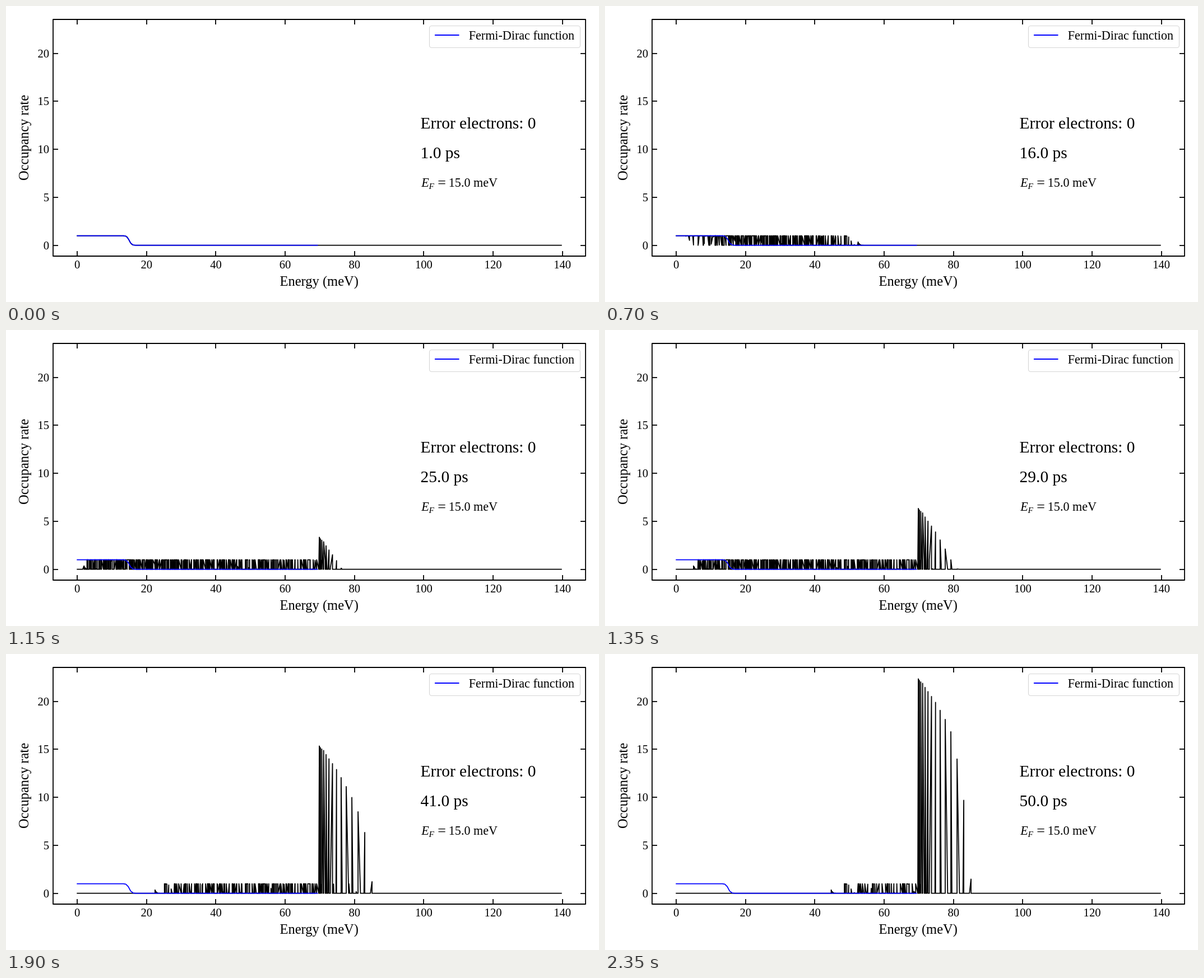
An HTML page with a canvas that plays this animation: 1058 by 529 pixels, repeating every 2.4 s.

```html
<!DOCTYPE html>
<html lang="en">
<head>
<meta charset="utf-8">
<title>Occupancy rate</title>
<style>
html, body { margin: 0; width: 100%; height: 100%; overflow: hidden; background: #fff; }
canvas { display: block; }
</style>
</head>
<body>
<canvas id="stage" width="1058" height="529"></canvas>
<script>
const ctx = document.getElementById('stage').getContext('2d');
const SERIF = '"Liberation Serif", "Times New Roman", serif';
const BOX = { left: 84, top: 24, right: 1034, bottom: 447 };
const LOOP = 2400, STEP = 50;

// Electron grid: N cells from the centre to the zone edge
const N = 30, CELL = 69.85 / (N * N), FERMI = 15, KT = 0.345;

const px = e => 127.2 + 6.182 * e;
const py = v => 427.7 - 17.15 * v;
const fermi = e => 1 / (1 + Math.exp((e - FERMI) / KT));
const initial = (i, j) => fermi(CELL * (i * i + j * j));

// States with kx >= 0, sorted by energy
const states = [];
for (let i = 0; i <= N; i++) {
  for (let j = -N; j <= N; j++) states.push({ i, j, q: i * i + j * j });
}
const order = q => (q % 7 === 4 || q % 7 === 5 ? -1 : 1);
states.sort((a, b) => a.q - b.q || order(a.q) * (a.i - b.i));

// The field shifts every row; electrons pile up at the zone edge
function occupancy({ i, j }, shift) {
  if (i < N) return initial(i - shift, j);
  let sum = 0;
  for (let k = N - shift; k <= N; k++) sum += initial(k, j);
  return sum;
}

function polyline(points, color) {
  ctx.beginPath();
  for (const [x, y] of points) ctx.lineTo(x, y);
  ctx.strokeStyle = color;
  ctx.stroke();
}

function text(str, x, y, size, align = 'left', style = '') {
  ctx.font = `${style} ${size}px ${SERIF}`;
  ctx.textAlign = align;
  ctx.fillStyle = '#000';
  ctx.fillText(str, x, y);
}

function drawAxes() {
  const { left, top, right, bottom } = BOX, len = 9;
  ctx.lineCap = 'butt';
  ctx.strokeStyle = '#000';
  ctx.strokeRect(left, top, right - left, bottom - top);
  for (let e = 0; e <= 140; e += 20) {
    const x = Math.round(px(e));
    polyline([[x, top], [x, top + len]], '#000');
    polyline([[x, bottom], [x, bottom - len]], '#000');
    text(e, px(e), 469, 20.6, 'center');
  }
  for (let v = 0; v <= 20; v += 5) {
    const y = Math.round(py(v));
    polyline([[left, y], [left + len, y]], '#000');
    polyline([[right, y], [right - len, y]], '#000');
    text(v, 77, py(v) + 7, 20.6, 'right');
  }
  text('Energy (meV)', 558.7, 500, 24.5, 'center');
  ctx.save();
  ctx.translate(40, 235.5);
  ctx.rotate(-Math.PI / 2);
  text('Occupancy rate', 0, 0, 24.5, 'center');
  ctx.restore();
}

function drawLegend() {
  ctx.save();
  ctx.lineWidth = 1.2;
  ctx.strokeStyle = '#d6d6d6';
  ctx.beginPath();
  ctx.roundRect(755.5, 35.5, 269, 39, 4);
  ctx.stroke();
  ctx.restore();
  polyline([[765, 52], [808.5, 52]], '#00f');
  text('Fermi-Dirac function', 825.7, 60, 22.1);
}

function drawNotes(ps) {
  text('Error electrons: 0', 739.6, 219.3, 29.45);
  text(ps.toFixed(1) + ' ps', 739.6, 271.7, 29.45);
  text('E', 741.3, 323, 22.1, 'left', 'italic');
  text('F', 754.6, 326.5, 15.4, 'left', 'italic');
  text('=', 770.2, 324, 26);
  text('15.0 meV', 789.8, 323, 22.1);
}

function draw(time) {
  const n = Math.floor((time % LOOP) / STEP);
  const ps = n + 1 + (n > 10) + (n > 34);
  const shift = Math.ceil(0.769 * (ps - 1));

  ctx.fillStyle = '#fff';
  ctx.fillRect(0, 0, 1058, 529);
  ctx.lineWidth = 1.8;
  ctx.lineJoin = 'round';
  ctx.lineCap = 'square';
  polyline(states.map(s => [px(CELL * s.q), py(occupancy(s, shift))]), '#000');

  const curve = [];
  for (let k = 0; k < 100; k++) curve.push([px(0.7 * k), py(fermi(0.7 * k))]);
  polyline(curve, '#00f');

  drawAxes();
  drawLegend();
  drawNotes(ps);
}

let start;
function tick(now) {
  start ??= now;
  draw(Math.max(0, now - start));
  requestAnimationFrame(tick);
}
draw(0);
requestAnimationFrame(tick);
</script>
</body>
</html>
```
